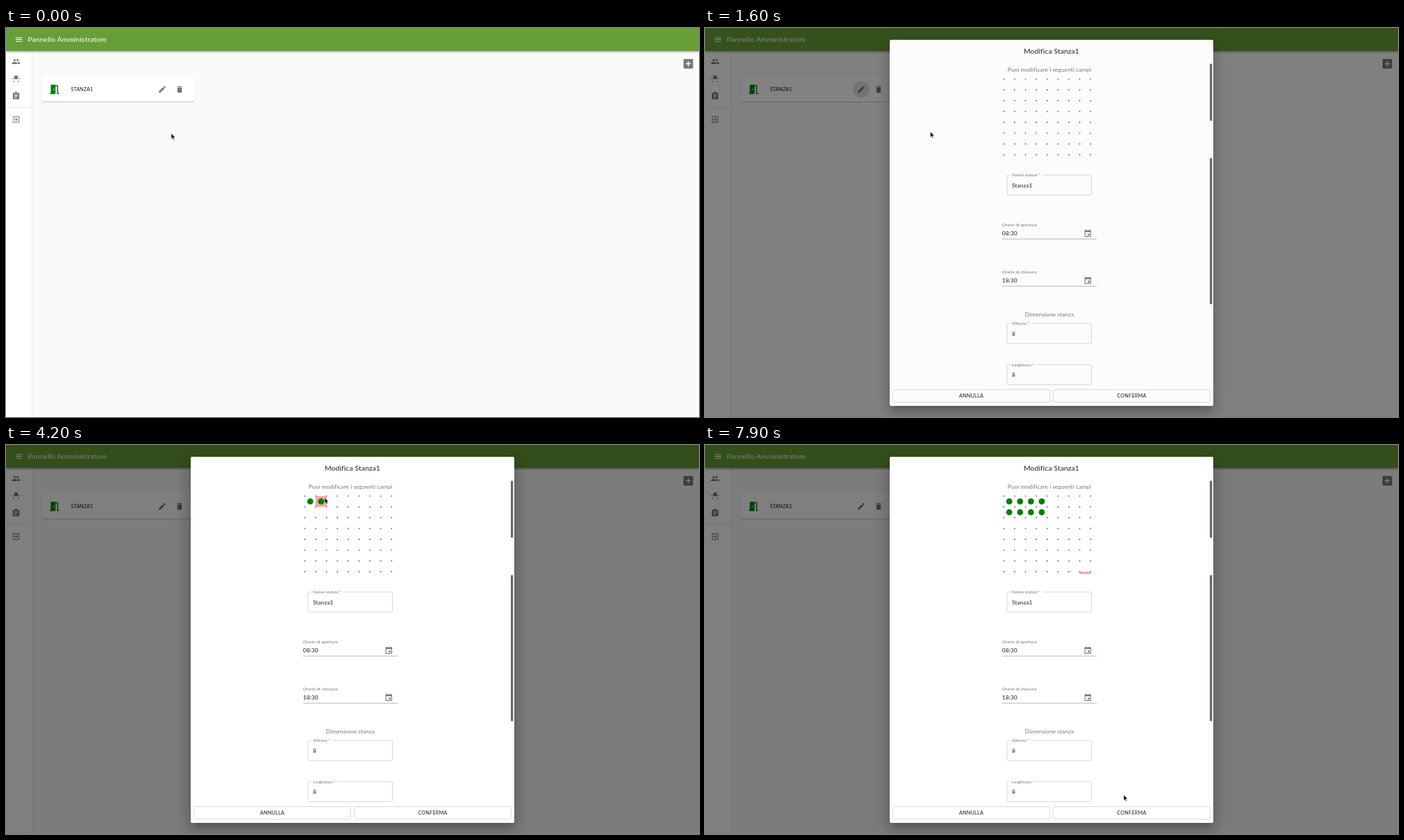
Write an HTML page that moves like this. It is 998 by 561 pixels and loops after 8 s.

```html
<!DOCTYPE html>
<html lang="it">
<head>
<meta charset="utf-8">
<style>
  html, body { margin: 0; width: 100%; height: 100%; overflow: hidden; background: #fafafa; }
  svg { display: block; width: 998px; height: 561px; font-family: Lato, "Open Sans", sans-serif; }
  foreignObject { overflow: visible; }
  .panel { height: 100%; background: #fff; border-radius: 2px; }
  .bar { background: #679e37; border-radius: 0; box-shadow: 0 1px 2px -.5px #0003, 0 2px 2.6px #0002, 0 .5px 5px #0002; }
  .card { box-shadow: 0 1px .5px -.5px #0003, 0 .5px .5px #0002, 0 .5px 1.5px #0002; }
  .paper { box-shadow: 0 6px 8px -4px #0003, 0 12px 20px 1.5px #0002, 0 5px 24px 4px #0002; }
</style>
</head>
<body>
<svg id="stage" viewBox="0 0 998 561"></svg>
<script>
const LOOP = 8000, STEP = 100;
const CELL = 15.6, LEFT = 430.4, TOP = 73.6, BOTTOM = 186;
const GREY = '#757575', INK = '#212121', GREEN = '#679e37';

// Outlines on a 24 unit square, filled even-odd.
const ICONS = {
  menu: 'M3 6h18v2H3zM3 11h18v2H3zM3 16h18v2H3z',
  people: 'M5 8a3 3 0 1 1 6 0a3 3 0 1 1-6 0zM13 8a3 3 0 1 1 6 0a3 3 0 1 1-6 0zM1 19v-2.5q0-3.5 7-3.5t7 3.5V19zM16 13q7 0 7 3.5V19h-6v-2.5q0-2-2-3.4z',
  seat: 'M4 21v-3h16v3h-3v-3H7v3zM2 10h3v3H2zM19 10h3v3h-3zM7 13V5l2-2h6l2 2v8z',
  list: 'M3 4l1-1h5a3 3 0 0 1 6 0h5l1 1v16l-1 1H4l-1-1zM7 7h10v2H7zM7 11h10v2H7zM7 15h7v2H7z',
  exit: 'M3 9V4l1-1h16l1 1v16l-1 1H4l-1-1v-5h2v4h14V5H5v4zM3 11h9.7L10 8.4 11.5 7l5 5-5 5-1.5-1.4 2.7-2.6H3z',
  add: 'M3 4l1-1h16l1 1v16l-1 1H4l-1-1zM11 7v4H7v2h4v4h2v-4h4v-2h-4V7z',
  door: 'M14 6v15H3v-2h2V3h9v1h5v15h2v2h-4V6zM10 11v2h2v-2z',
  edit: 'M3 17.3V21h3.7L17.8 9.9 14 6.2zM15.1 5.1l2.6-2.5 3.7 3.7-2.5 2.6z',
  trash: 'M6 7h12v13l-1 1H7l-1-1zM5 4h3.5l1-1h5l1 1H19v2H5z',
  date: 'M3 4l1-1h16l1 1v16l-1 1H4l-1-1zM5 8v11h14V8zM12 12h5v5h-5zM6 1h2v2H6zM16 1h2v2h-2z'
};

const icon = (name, x, y, fill = GREY, k = .521) =>
  `<path id="${name}" d="${ICONS[name]}" fill="${fill}" fill-rule="evenodd" transform="translate(${x} ${y}) scale(${k}) translate(-12 -12)"/>`;
const text = (s, x, y, size, fill = INK, gap = .08, anchor = 'start') =>
  `<text x="${x}" y="${y}" font-size="${size}" fill="${fill}" letter-spacing="${gap}" text-anchor="${anchor}">${s}</text>`;
const centred = (s, x, y, size, fill, gap) => text(s, x, y, size, fill, gap, 'middle');
const rect = (x, y, w, h, fill, extra = '') =>
  `<rect x="${x}" y="${y}" width="${w}" height="${h}" fill="${fill}" ${extra}/>`;
const panel = (x, y, w, h, kind) =>
  `<foreignObject x="${x}" y="${y}" width="${w}" height="${h}"><div class="panel ${kind}"></div></foreignObject>`;

const label = (s, x, y) => text(s, x, y, 6.25, GREY, .06);
const boxField = (y, name, value, notch) =>
  `<path d="M${notch} ${y}H554.5q2 0 2 2v25q0 2-2 2H437q-2 0-2-2v-25q0-2 2-2h3" fill="none" stroke="#bdbdbd" stroke-width=".6"/>` +
  label(name, 442, y + 2.2) + text(value, 442, y + 17.5, 8.33);
const timeField = (y, name, value) =>
  label(name, 427.8, y - 17.8) + text(value, 427.8, y - 5.2, 8.33) +
  rect(428, y - .3, 136, .6, '#8c8c8c') + icon('date', 551.3, y - 7.8);
const button = (x, s) =>
  rect(x, 521.5, 226, 18, 'none', 'rx="2" stroke="#c4c4c4" stroke-width=".6"') +
  centred(s, x + 113, 533.3, 7.29, INK, .2);
const scrollbar = (y, h) => rect(727, y, 3.3, h, '#686868', 'rx="1.4"');

const cellX = c => LEFT + c * CELL, cellY = r => TOP + r * CELL;
const seats = Array.from({ length: 8 }, (_, i) => ({ col: i % 4, row: i >> 2, time: 3600 + 460 * i }));
const dots = Array.from({ length: 72 }, (_, i) =>
  `<circle cx="${cellX(i % 9)}" cy="${cellY(Math.floor(i / 9))}" r=".95" fill="#666"/>`).join('');
const discs = seats.map(s =>
  `<circle class="seat" cx="${cellX(s.col + .5)}" cy="${cellY(s.row + .5)}" r="4.4" fill="green"/>`).join('');
const sidebar = ['people', 'seat', 'list'].map((name, i) => icon(name, 14.5, 48.4 + 24.85 * i)).join('');

document.getElementById('stage').innerHTML =
  rect(0, 33, 37.5, 528, '#fff') + rect(37.3, 33, .7, 528, '#dcdcdc') + rect(0, 114.6, 37.5, .7, '#dcdcdc') +
  panel(0, 0, 998, 33.4, 'bar') +
  icon('menu', 18.6, 16.6, '#fff') + text('Pannello Amministratore', 31.2, 20.3, 10.42, '#fff') +
  sidebar + icon('exit', 14.5, 132) + icon('add', 982.6, 51.6, GREY, .76) +
  panel(52, 70, 219, 36.4, 'card') +
  icon('door', 69.8, 88.5, 'green', .76) + text('STANZA1', 93.5, 90.8, 7.25, INK, 0) +
  '<circle id="ripple" cx="225" cy="88.5"/>' + icon('edit', 225, 88.5) + icon('trash', 250, 88.5) +
  rect(0, 0, 998, 561, '#000', 'id="shade"') +
  '<g id="dialog">' +
    panel(266, 16.5, 466, 528, 'paper') +
    centred('Modifica Stanza1', 499, 36.7, 10.42) +
    centred('Puoi modificare i seguenti campi', 496, 63.1, 8.33, GREY) +
    dots + rect(0, 0, CELL, CELL, '#f00', 'id="hover" fill-opacity=".36"') + discs +
    boxField(212, 'Nome stanza *', 'Stanza1', 486) +
    timeField(304.2, 'Orario di apertura', '08:30') +
    timeField(372.2, 'Orario di chiusura', '18:30') +
    centred('Dimensione stanza', 496, 416.3, 8.33, GREY) +
    boxField(426.2, 'Altezza *', '8', 470) + boxField(485.4, 'Larghezza *', '8', 477) +
    button(270.5, 'ANNULLA') + button(501.5, 'CONFERMA') +
    scrollbar(51.5, 82.5) + scrollbar(187.5, 211) +
  '</g>' +
  '<path id="cursor" d="M0 0V8.2L1.9 6.5 3.2 9.5 4.5 8.9 3.2 6 5.7 5.8Z" fill="#111" stroke="#fff" stroke-width=".5" stroke-linejoin="round"/>';

// Pointer stops: arrival, departure, x, y. Each seat is left right after its click.
const stops = [
  [0, 500, 238, 152], [1000, 1400, 222.5, 94], [1500, 1500, 271, 119.5], [1600, 1600, 324.5, 149.5],
  [1800, 1900, 511, 172],
  ...seats.map((s, i) => [i ? s.time - 160 : 2800, s.time, 436 + s.col * CELL, 76 + s.row * 21.5]),
  [7200, 7300, 565, 237], [7600, 7700, 590, 418], [7900, LOOP, 603, 504.5]
];

function pointer(t) {
  const i = stops.findLastIndex(s => s[0] <= t);
  const [, leave, x, y] = stops[i];
  if (t <= leave) return [x, y];
  const [arrive, , nx, ny] = stops[i + 1], k = (t - leave) / (arrive - leave);
  return [x + (nx - x) * k, y + (ny - y) * k];
}

const set = (id, attrs) => {
  for (const a in attrs) document.getElementById(id).setAttribute(a, attrs[a]);
};
const cell = v => Math.max(0, Math.min(7, Math.floor(v / CELL)));
const discNodes = document.querySelectorAll('.seat');

function draw(t) {
  const [x, y] = pointer(t);
  set('cursor', { transform: `translate(${x} ${y})` });

  const open = Math.max(0, Math.min(1, .57 + (t - 1500) * .0041)) * (t >= 1500);
  set('shade', { opacity: open / 2 });
  set('dialog', { opacity: open });

  const pressed = t >= 1200 && t < 1500;
  set('edit', { fill: t >= 900 && t < 1500 ? GREEN : GREY });
  set('ripple', {
    r: pressed ? Math.min(12, 7 + (t - 1200) / 40) : 12,
    fill: pressed ? GREEN : '#000',
    opacity: pressed ? .32 : open && Math.max(0, .18 - (t - 1500) * .0006)
  });

  // The last cell touched stays lit after the pointer leaves the grid.
  const top = cellY(cell(y - TOP));
  set('hover', {
    x: cellX(cell(x - LEFT)), y: top, height: Math.min(CELL, BOTTOM - top),
    opacity: +(t >= 1800)
  });
  discNodes.forEach((node, i) => node.setAttribute('opacity', +(t >= seats[i].time)));
}

const start = performance.now();
function tick() {
  const t = (performance.now() - start) % LOOP;
  draw(Math.floor(t / STEP) * STEP);
  requestAnimationFrame(tick);
}
tick();
</script>
</body>
</html>
```
